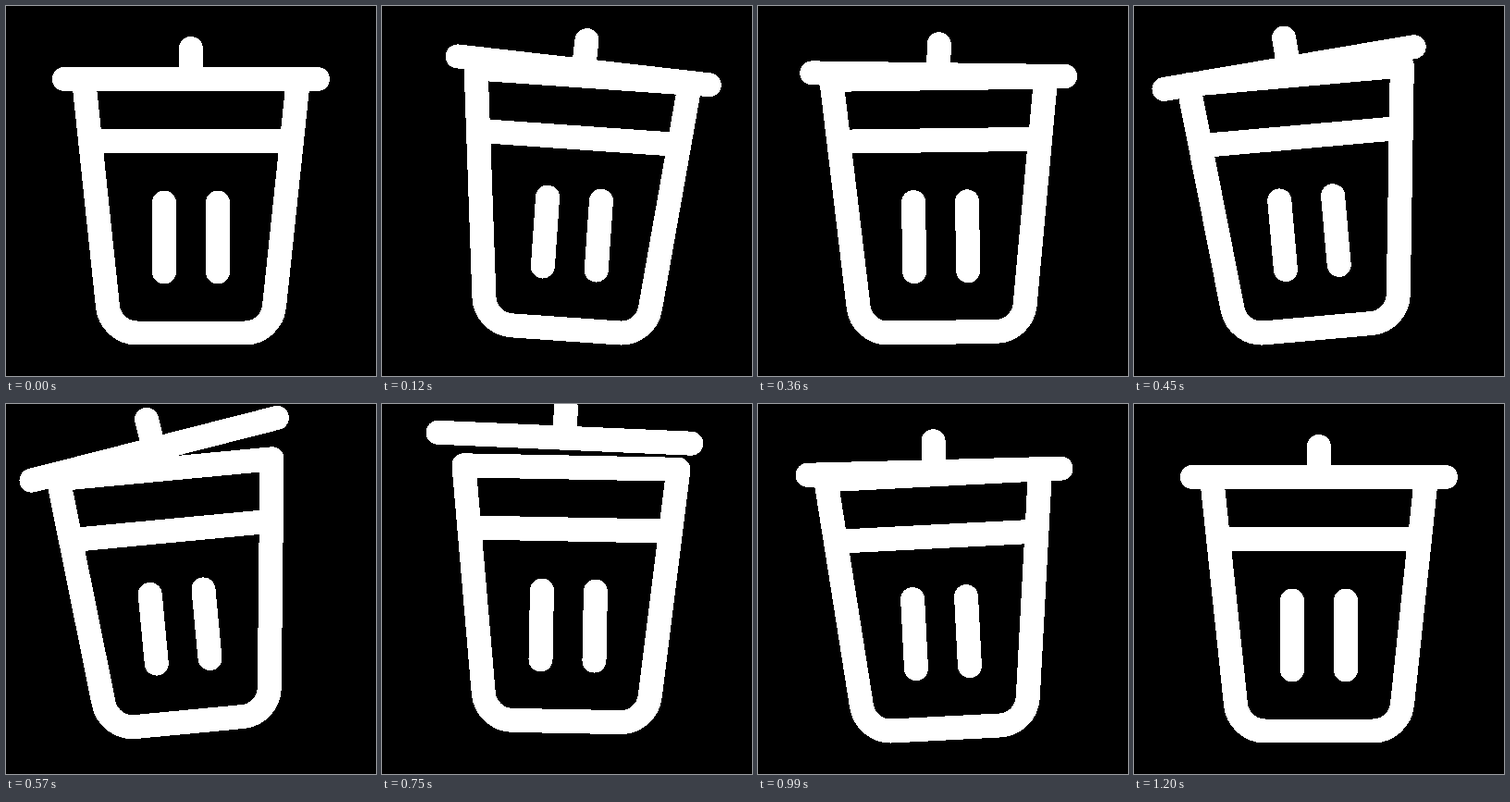
An HTML page for the animation above (3.23 s loop, 400 by 400 pixels).

```html
<!DOCTYPE html>
<html lang="en">
<head>
<meta charset="utf-8">
<title>Shaking bin</title>
<style>
  html, body { margin: 0; height: 100%; overflow: hidden; background: #000; }
  svg { display: block; width: 100%; height: 100%; }
  g {
    fill: none; stroke: #fff; stroke-width: 26;
    stroke-linejoin: round; stroke-linecap: round; shape-rendering: crispEdges;
  }
</style>
</head>
<body>
<svg viewBox="0 0 400 400">
  <g id="bin">
    <path d="M84 79L110 325A32 32 0 0 0 142 353.5H258A32 32 0 0 0 290 325L316 79Z"/>
    <path d="M92 146H308" stroke-linecap="butt"/>
    <path d="M171 212.5V287.5M229 212.5V287.5"/>
    <g id="lid"><path d="M63 79H337M200 46V79"/></g>
  </g>
</svg>
<script>
const LOOP = 3230, STEP = 30, END = 1200;
const bin = document.getElementById('bin');
const lid = document.getElementById('lid');

// Sine easing from rest, through the turning points [time, value], back to rest
function swing(t, ...turns) {
  let from = [0, 0];
  for (const to of [...turns, [END, 0]]) {
    if (t <= to[0]) {
      const u = (t - from[0]) / (to[0] - from[0]);
      return from[1] + (to[1] - from[1]) * (1 - Math.cos(Math.PI * u)) / 2;
    }
    from = to;
  }
  return 0;
}

// Parabolic jump
function hop(t, start, length, height) {
  const u = (t - start) / length;
  return -height * Math.max(0, 4 * u * (1 - u));
}

function place(el, x, y, angle, px, py) {
  el.setAttribute('transform', `translate(${x} ${y}) rotate(${angle} ${px} ${py})`);
}

function draw(now) {
  const t = Math.min(END, Math.floor(now % LOOP / STEP) * STEP);

  // The bin rocks on its lower corners and jumps once
  const tilt = swing(t, [190, 5.7], [510, -6.1], [840, 2.6], [1000, -3]);
  const slide = swing(t, [240, 0.5], [540, -5], [780, 0], [990, 1.8]);
  place(bin, slide, hop(t, 525, 360, 10), tilt, tilt > 0 ? 258 : 142, 322);

  // The lid rides on the bin, rattles and is tossed up
  const shift = swing(t, [360, 0], [520, -10], [720, -8], [960, 1.5]);
  const rise = swing(t, [240, -11.4], [360, -4], [720, -33.3], [930, -1], [1080, -7]);
  const flap = swing(t, [250, 5.3], [570, -8.9], [800, 2.7]);
  place(lid, shift, rise, flap, 200, 79);
}

let start;
function tick(now) {
  start ??= now;
  draw(now - start);
  requestAnimationFrame(tick);
}
draw(0);
requestAnimationFrame(tick);
</script>
</body>
</html>
```
